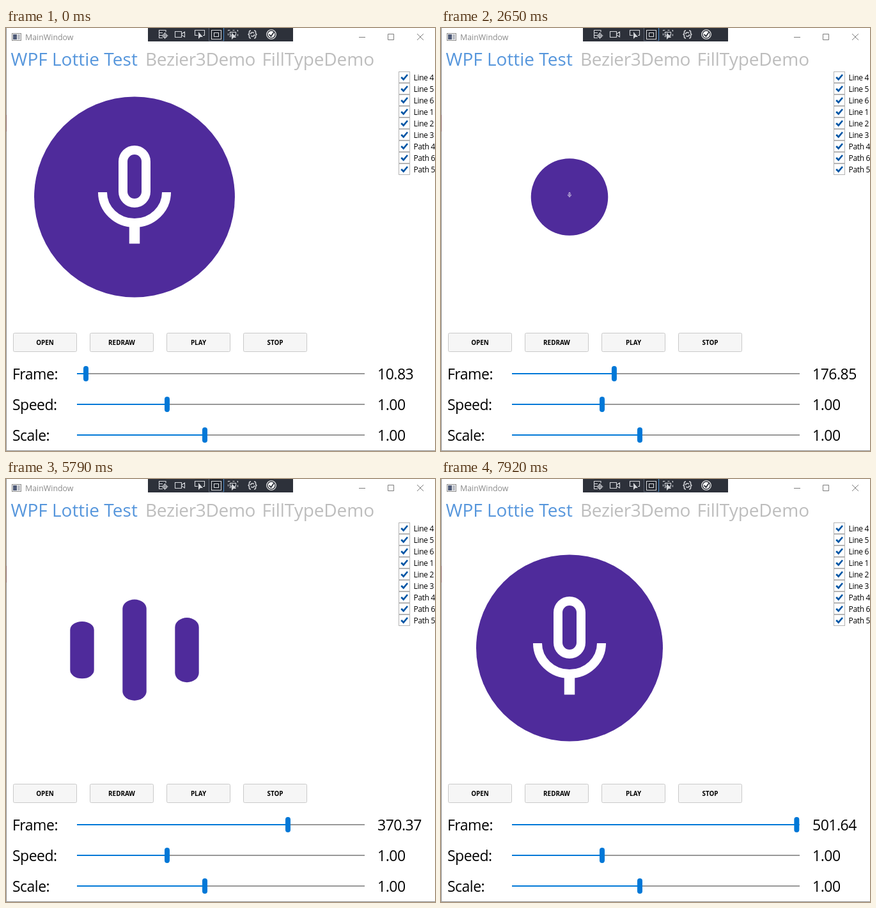
These frames come from a looping animation (671x662 px, 7960 ms). An HTML page:

```html
<!DOCTYPE html>
<html lang="en">
<head>
<meta charset="utf-8">
<title>MainWindow</title>
<style>
  html, body { margin: 0; width: 100%; height: 100%; overflow: hidden; background: #fff; }
  svg { display: block; width: 671px; height: 662px; font-family: "Open Sans", "Noto Sans", sans-serif; }
</style>
</head>
<body>
<svg viewBox="0 0 671 662" xmlns="http://www.w3.org/2000/svg">
  <g id="chrome"></g>
  <g fill="none" stroke="#d4d6da" stroke-width="1.1">
    <rect x="222" width="227" height="21" fill="#2d313a" stroke="none"/>
    <g>
      <path d="M239 3.5h11v3M239 7.5h6m-6 4h5m-5 4h6M239.5 3v13M248.5 7v10m-5-5h10"/>
      <circle cx="248.5" cy="12" r="3"/>
    </g>
    <path d="M264.5 5.5h10v9h-10zM275 9l4.500-3v8l-4.500-3"/>
    <path d="M300 11.500h-4.500v-8h15v8h-2.500"/>
    <path id="pointer" d="M301 6v11l3-3h4z" fill="#d4d6da" stroke="none"/>
    <path d="M317.5 0v20h23v-20" fill="#22262e" stroke="#596170"/>
    <path d="M340.5 0v20" stroke="#4a8ac8"/>
    <path d="M321.5 3.5h15v14h-15zM325.5 7.5h7v6h-7z"/>
    <rect x="347.5" y="3.5" width="15" height="10" stroke-dasharray="3 4"/>
    <rect x="350.5" y="6.5" width="9" height="5"/>
    <use href="#pointer" x="52" y="1"/>
    <g stroke-width="1.5">
      <path id="brace" d="M383 4q-3 0-2.500 3 0 3-2 3 2 0 2 3-.5 3 2.500 3"/>
      <use href="#brace" transform="matrix(-1 0 0 1 771 0)"/>
      <circle cx="385.5" cy="10" r="3" stroke-dasharray="7 2.4"/>
    </g>
    <circle cx="415" cy="10" r="7.3" stroke="#fff"/>
    <circle cx="415" cy="10" r="5.3" fill="#fff" stroke="none"/>
    <path d="M411.5 10l3 3 4.500-6.500" stroke="#2d313a" stroke-width="1.8"/>
  </g>
  <g fill="#4f2b9b">
    <circle id="ring" cx="201" cy="264.5" fill="#e6e2f1"/>
    <g id="bars"></g>
    <circle id="disc" cx="201" cy="264.5"/>
    <g id="mic" fill="none" stroke="#fff" stroke-width="14">
      <rect x="183" y="191" width="36" height="83" rx="18"/>
      <path d="M151 257A50 48 0 0 0 251 257"/>
      <path d="M201 306V337.5" stroke-width="16.5"/>
    </g>
  </g>
  <g id="controls"></g>
</svg>
<script>
const LOOP = 7960;
const BLUE = '#0078d7';
const $ = id => document.getElementById(id);

function add(parent, tag, attrs, text = '') {
  const el = document.createElementNS('http://www.w3.org/2000/svg', tag);
  for (const key in attrs) el.setAttribute(key, attrs[key]);
  el.textContent = text;
  return parent.appendChild(el);
}

function label(parent, text, x, y, size, fill = '#000', extra = {}) {
  return add(parent, 'text', { x, y, 'font-size': size, fill, ...extra }, text);
}

function line(parent, d, stroke, width = 1) {
  return add(parent, 'path', { d, stroke, 'stroke-width': width, fill: 'none' });
}

// Window frame, title and tabs
const chrome = $('chrome');
line(chrome, 'M.5 0V661.5H671', '#8f8f8f');
line(chrome, 'M.5 136V162', '#8a6a6e');
add(chrome, 'rect', { x: 9.5, y: 8.5, width: 14, height: 11, fill: '#f4f4f4', stroke: '#8c8c8c' });
add(chrome, 'rect', { x: 11, y: 10, width: 6, height: 8, fill: '#4f5b78' });
add(chrome, 'rect', { x: 18, y: 10, width: 4, height: 8, fill: '#b9bcc4' });
label(chrome, 'MainWindow', 30, 19, 12.4, '#8a8a8a');
line(chrome, 'M552 14.5h10M597.5 9.5h9v9h-9zM643 9l10 10m0-10l-10 10', '#7d7d7d');
label(chrome, 'WPF Lottie Test', 7.5, 59, 28, '#5696dc');
label(chrome, 'Bezier3Demo', 218, 59, 28, '#bdbdbd', { 'letter-spacing': -.35 });
label(chrome, 'FillTypeDemo', 400.5, 59, 28, '#bdbdbd', { 'letter-spacing': -.1 });

// Layer list
['Line 4', 'Line 5', 'Line 6', 'Line 1', 'Line 2', 'Line 3', 'Path 4', 'Path 6', 'Path 5'].forEach((name, i) => {
  const y = 68 + i * 18;
  add(chrome, 'rect', { x: 614.5, y: y + .5, width: 17, height: 17, fill: '#fff', stroke: '#b4b4b4' });
  line(chrome, `M618.2 ${y + 9}l3.5 3.5 6.3-7.5`, '#0055a5', 2.7);
  label(chrome, name, 637.5, y + 14, 12, '#000', { 'letter-spacing': -.3 });
});

// Buttons and sliders
const controls = $('controls');
['OPEN', 'REDRAW', 'PLAY', 'STOP'].forEach((name, i) => {
  const x = 11.5 + i * 120;
  add(controls, 'rect', { x, y: 477.5, width: 99, height: 29, rx: 2, fill: '#f6f6f6', stroke: '#c9c9c9' });
  label(controls, name, x + 49.5, 496, 9.9, '#000', { 'font-weight': 700, 'text-anchor': 'middle' });
});

function slider(name, y) {
  const spacing = { 'letter-spacing': -.5 };
  label(controls, name, 10, y + 9, 23, '#000', spacing);
  line(controls, `M111 ${y}H561`, '#999', 2);
  const filled = line(controls, '', BLUE, 2);
  const thumb = add(controls, 'rect', { y: y - 12, width: 8, height: 24, rx: 4, fill: BLUE });
  const value = label(controls, '', 581, y + 9, 23, '#000', spacing);
  return (x, amount) => {
    filled.setAttribute('d', `M111 ${y}H${x}`);
    thumb.setAttribute('x', x - 4);
    value.textContent = amount.toFixed(2);
  };
}
const setFrame = slider('Frame:', 541);
slider('Speed:', 589)(252, 1);
slider('Scale:', 637)(311, 1);

// Eased step from 0 to 1, and a bump built from two of them
function rise(at, start, span) {
  const s = Math.min(1, Math.max(0, (at - start) / span));
  return s * s * (3 - 2 * s);
}
const pulse = (at, peak, half) => rise(at, peak - half, half) - rise(at, peak, half);

// Playback starts slightly fast, then settles to a steady rate
const frameAt = time => 10.83 + .06163 * time + 2.7 * Math.min(1, time / 1900);

function makeBar(x, base, swing, period) {
  const el = add($('bars'), 'rect', { x: x - 18.7, width: 37.4, rx: 18.7 });
  return frame => {
    const phase = Math.max(0, frame - 229) / period;
    const present = rise(frame, 183, 44) - rise(frame, 428, 22);
    const scale = present * (1 + swing * Math.sin(2 * Math.PI * phase));
    el.setAttribute('y', 267.6 - base * scale / 2);
    el.setAttribute('height', base * scale);
    el.setAttribute('ry', 18.7 * scale);
  };
}
const bars = [
  makeBar(119, 127, .31, 83),
  makeBar(201, 207, -.32, 66.3),
  makeBar(283, 127, -.25, 60.2)
];

function draw(time) {
  const frame = frameAt(time);
  setFrame(115.5 + frame * .8788, frame);

  const discScale = 1 - rise(frame, 151, 46.3) + rise(frame, 425, 45);
  $('disc').setAttribute('r', 146 * discScale + 24 * pulse(frame, 23, 23));

  const swell = pulse(frame, 98, 16);
  $('ring').setAttribute('r', swell && 146 + 38 * swell);

  const micScale = 1 - rise(frame, 151, 30) + rise(frame, 446, 30);
  $('mic').setAttribute('transform', `translate(201 261) scale(${micScale}) translate(-201 -261)`);

  bars.forEach(update => update(frame));
}

const start = performance.now();
function tick(now) {
  const elapsed = Math.max(0, now - start) % LOOP;
  draw(Math.floor(elapsed / 10) * 10);
  requestAnimationFrame(tick);
}
draw(0);
requestAnimationFrame(tick);
</script>
</body>
</html>
```
